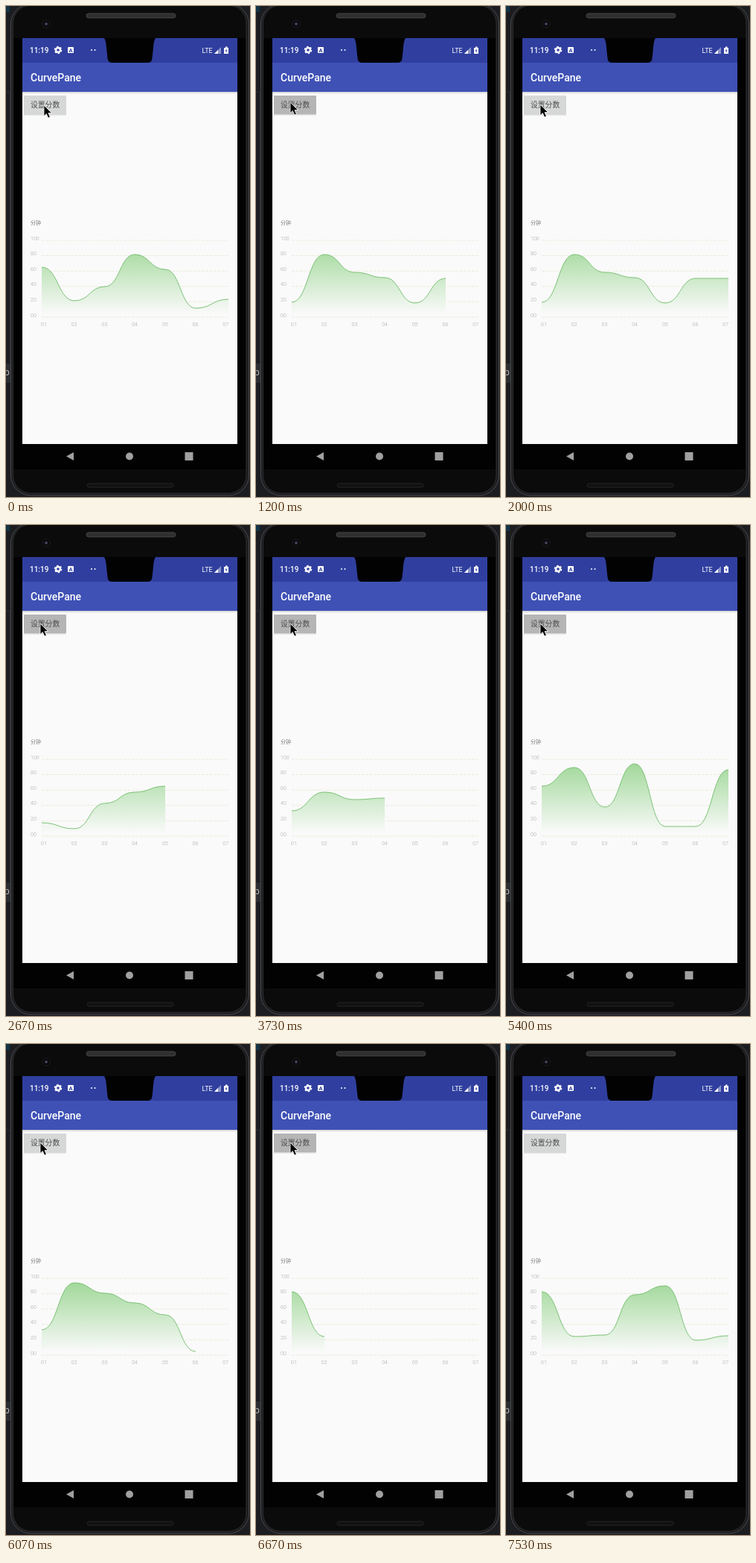
Animation of 328 by 658 pixels, one loop 7590 ms. Source, as an HTML page:

```html
<!DOCTYPE html>
<html lang="zh">
<head>
<meta charset="utf-8">
<title>CurvePane</title>
<style>
html, body { margin: 0; width: 100%; height: 100%; overflow: hidden; background: #1b1d21; }
svg { display: block; width: 328px; height: 658px; font-family: Roboto, "Noto Sans CJK SC", "Noto Sans CJK", sans-serif; }
.axis { font-size: 7px; font-weight: 300; fill: #a6a6a6; }
.grid { stroke: #ecebdc; stroke-width: 1; stroke-dasharray: 4 1.5; }
.edge { stroke: #4a4a4e; }
</style>
</head>
<body>
<svg viewBox="0 0 328 658">
  <defs>
    <linearGradient id="fade" gradientUnits="userSpaceOnUse" x1="0" y1="314" x2="0" y2="413">
      <stop offset="0" stop-color="#9cd694"/>
      <stop offset="1" stop-color="#fafafa"/>
    </linearGradient>
    <linearGradient id="shade" x1="0" y1="0" x2="0" y2="1">
      <stop offset="0" stop-color="#cfcfcf"/>
      <stop offset="1" stop-color="#fafafa"/>
    </linearGradient>
  </defs>

  <!-- phone body -->
  <rect width="328" height="658" fill="#1b1d21"/>
  <rect width="5" height="8" fill="#123447"/>
  <path d="M0 115H5V478" fill="none" class="edge" stroke-opacity=".4"/>
  <rect y="479" width="6" height="26" fill="#2b2d30"/>
  <text x="-2" y="495" font-size="12" fill="#bbb">p</text>
  <rect x="6.5" y="-3" width="320" height="659" rx="27" fill="#1c1c1e" class="edge"/>
  <rect x="9.5" y="-1" width="313.5" height="654" rx="24" fill="#0b0b0c" class="edge" stroke-opacity=".5"/>
  <rect x="10" y="43" width="312" height="578" fill="#020202"/>
  <rect x="108" y="10" width="120" height="6" rx="3" fill="#302e2e" stroke="#444"/>
  <rect x="109" y="640" width="116" height="5" rx="2.5" fill="#111" stroke="#242424"/>
  <circle cx="54" cy="24" r="5" fill="#08080a" stroke="#1e1e22"/>
  <circle cx="54" cy="24" r="2" fill="#42425c"/>

  <!-- status and title bars -->
  <rect x="22" y="43" width="289" height="33" fill="#303f9f"/>
  <path d="M132 43H201C199 46 198.500 50 198 56L196.500 70Q196 76 190 76H143Q137 76 136.500 70L135 56C134.500 50 134 46 132 43Z" fill="#020202"/>
  <g fill="#fff">
    <text x="32" y="63" font-size="10" font-weight="500">11:19</text>
    <circle cx="70" cy="59" r="3" fill="none" stroke="#fff" stroke-width="2.400"/>
    <circle cx="70" cy="59" r="4.500" fill="none" stroke="#fff" stroke-width="1.600" stroke-dasharray="2.350"/>
    <rect x="83" y="55" width="8" height="8" rx="1"/>
    <text x="87" y="61.800" font-size="7.500" font-weight="700" text-anchor="middle" fill="#303f9f">A</text>
    <circle cx="115" cy="59" r="1"/>
    <circle cx="119.500" cy="59" r="1"/>
    <text x="263.500" y="63" font-size="9">LTE</text>
    <path d="M280 64L289 55V64Z" fill-opacity=".45"/>
    <path d="M280 64L285 59V64Z"/>
    <path d="M293 56H295V54.500H297.500V56H299V64H293Z"/>
  </g>
  <path d="M296.500 57L294.500 60.500H296L295.500 63L297.700 59.500H296.200Z" fill="#303f9f"/>
  <rect x="22" y="76" width="289" height="39" fill="#3f51b5"/>
  <text x="33" y="101" font-size="14" font-weight="500" fill="#fff">CurvePane</text>

  <!-- page -->
  <rect x="22" y="115" width="289" height="472" fill="#fafafa"/>
  <rect x="22" y="115" width="289" height="3" fill="url(#shade)"/>
  <rect x="24" y="121" width="57" height="25.500" rx="1" fill="#c4c4c4" opacity=".6"/>
  <rect x="24" y="120" width="57" height="25" rx="1" fill="#d6d7d7"/>
  <rect id="press" x="24" y="120" width="57" height="25" rx="1" fill="#b5b5b5" opacity="0"/>
  <text x="33" y="136" font-size="9.800" fill="#4c4c4c">设置分数</text>

  <text x="33" y="293" font-size="7" fill="#777">分钟</text>
  <g id="axes"></g>
  <path id="area" fill="url(#fade)"/>
  <path id="line" fill="none" stroke="#7cc276"/>

  <!-- navigation -->
  <rect x="22" y="587" width="289" height="34" fill="#020202"/>
  <g fill="#a0a0a0">
    <path d="M81 603.500L91 598V609Z"/>
    <circle cx="166" cy="603.500" r="5"/>
    <rect x="240.500" y="598" width="11" height="11"/>
  </g>

  <path id="cursor" d="M0 0V14.500L3.300 11.500L5.700 17L8.300 15.900L6 10.500H10.500Z" fill="#000" stroke="#fff" stroke-width=".8"/>
</svg>
<script>
const LOOP = 7590, STEP = 110, BASE = 413;
const xs = [48, 92, 133, 173, 214, 255, 299];
// start time, then the height of each point
const runs = [
  [-2000, 350, 395, 376, 333, 353, 405, 393],
  [630, 397, 333, 357, 364, 398, 365, 365],
  [2175, 399, 407, 373, 358, 350, 365, 365],
  [3345, 383, 358, 368, 366, 365, 365, 365],
  [4405, 350, 325, 378, 320, 404, 404, 328],
  [5430, 383, 320, 334, 347, 363, 412, 390],
  [6500, 332, 392, 390, 336, 324, 397, 391]
];
// time, x, y
const moves = [
  [0, 51, 133], [300, 46, 129], [1300, 46, 129],
  [1600, 46, 132], [7270, 46, 132], [7480, -20, 146], [LOOP, -20, 146]
];
const el = id => document.getElementById(id);
const clamp = v => Math.max(0, Math.min(1, v));

let axes = "";
for (let i = 0; i < 6; i++) {
  const y = 314 + i * 20.6;
  const label = String(100 - i * 20).padStart(2, "0");
  axes += `<path class="grid" d="M48 ${y}H299"/><text class="axis" x="33" y="${y - .5}">${label}</text>`;
}
for (let i = 0; i < 7; i++) {
  axes += `<text class="axis" text-anchor="middle" x="${51 + i * 40.7}" y="429">0${i + 1}</text>`;
}
el("axes").innerHTML = axes;

function curve(ys, count) {
  let d = `M${xs[0]} ${ys[0]}`;
  for (let i = 1; i <= count; i++) {
    const mid = (xs[i - 1] + xs[i]) / 2;
    d += `C${mid} ${ys[i - 1]} ${mid} ${ys[i]} ${xs[i]} ${ys[i]}`;
  }
  return d;
}

function cursorAt(t) {
  const i = Math.max(1, moves.findIndex(m => m[0] > t));
  const [t0, x0, y0] = moves[i - 1], [t1, x1, y1] = moves[i];
  const k = (t - t0) / (t1 - t0);
  return `translate(${x0 + (x1 - x0) * k} ${y0 + (y1 - y0) * k})`;
}

function draw(t) {
  const [start, ...ys] = runs.filter(r => r[0] <= t).pop();
  const age = t - start;
  const count = Math.min(6, Math.floor(age / STEP));
  const d = curve(ys, count);
  el("line").setAttribute("d", d);
  el("area").setAttribute("d", `${d}V${BASE}H${xs[0]}Z`);
  // the button darkens shortly before each run begins
  const next = runs.find(r => r[0] > t);
  const lead = next ? clamp((t - next[0] + 90) / 60) : 0;
  const held = clamp((630 - age) / 50);
  el("press").setAttribute("opacity", Math.max(lead, held));
  el("cursor").setAttribute("transform", cursorAt(t));
}

const begin = performance.now();
function tick() {
  draw((performance.now() - begin) % LOOP);
  requestAnimationFrame(tick);
}
tick();
</script>
</body>
</html>
```
